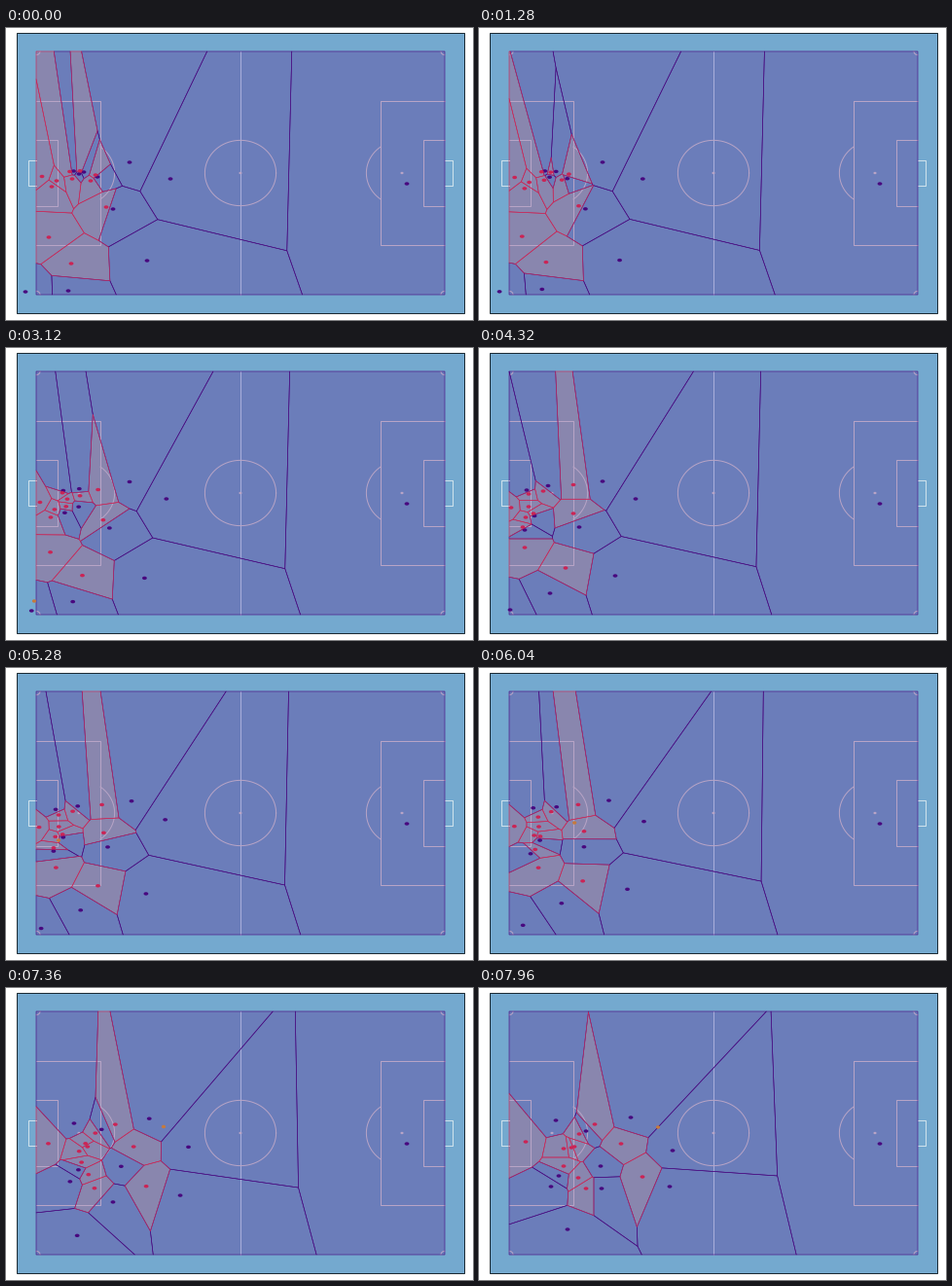
Recreate the animation shown at these times as a matplotlib script. Size 480x300 px, loop 8 s.

```python
import numpy as np
import matplotlib.pyplot as plt
from matplotlib.animation import FuncAnimation
from matplotlib.collections import EllipseCollection, PolyCollection
from matplotlib.patches import Rectangle

W, H, DPI = 480, 300, 100
STEP, FRAMES = 40, 200
TURN, END = 4320, 7960          # ms: the side drops back, then pushes out
LEFT, TOP, RIGHT, BOTTOM = 31, 24, 451, 274
SX, SY = (RIGHT - LEFT) / 105, (BOTTOM - TOP) / 68   # pixels per metre
PX = 72 / DPI

INDIGO, CRIMSON, ORANGE = "#48087f", "#cb2455", "#c67a3c"
BLUE_CELL, RED_CELL = "#6b7dba", "#8986ae"
CHALK, MIDLINE, GOAL = "#b7a4c6", "#a9aedb", "#cfe2ec"

team, runs = [], []


def run(color, start, turn=None, end=None):
    """A player's run: where it starts, turns and ends."""
    team.append(color)
    runs.append((start, turn or start, end or start))


run(INDIGO, (412, 160))
run(INDIGO, (127, 138), (127, 137), (156, 133))
run(INDIGO, (169, 155), (161, 155), (199, 167))
run(INDIGO, (110, 186), (103, 184), (125, 183))
run(INDIGO, (145, 239), (140, 234), (196, 204))
run(INDIGO, (64, 270), (73, 252), (126, 206))
run(INDIGO, (20, 271), (32, 269), (91, 248))
run(INDIGO, (69.5, 147), (49, 146), (79, 136))
run(INDIGO, (80, 148), (71, 141.5), (110, 147))
run(INDIGO, (75, 150), (47, 187), (74, 204))
run(INDIGO, (94, 153), (57, 172.5), (82, 193))

run(CRIMSON, (37, 152.5), (33, 164), (48, 158))
run(CRIMSON, (65.5, 147.5), (51, 150), (95, 164))
run(CRIMSON, (87, 157), (66, 147), (103, 150))
run(CRIMSON, (76, 146.7), (51, 163), (98, 163))
run(CRIMSON, (52, 157), (48, 174), (87, 165))
run(CRIMSON, (68, 155), (56, 170), (87, 183))
run(CRIMSON, (47, 163), (45, 184), (102, 195))
run(CRIMSON, (92, 151), (97, 140.5), (119, 140))
run(CRIMSON, (103, 184), (97, 170), (146, 160))
run(CRIMSON, (44, 215), (47, 205), (110, 206))
run(CRIMSON, (67, 242), (89, 226), (168, 194))

START, MIDDLE, FINISH = np.array(runs, float).transpose(1, 0, 2)


def positions(t):
    """Both phases set off slowly and gather speed."""
    if t < TURN:
        return START + (MIDDLE - START) * (t / TURN) ** 2
    return MIDDLE + (FINISH - MIDDLE) * ((t - TURN) / (END - TURN)) ** 2


def ball_at(t):
    """Played in from the corner, held in the box, then cleared."""
    times = (3120, TURN, 5280, 6760, END)
    return (np.interp(t, times, (29, 56, 54, 140, 184)),
            np.interp(t, times, (260, 171, 177, 142, 143)))


def clip(poly, a, b, c):
    """Keep the part of poly where a*x + b*y <= c."""
    dist = [a * x + b * y - c for x, y in poly]
    if max(dist) <= 0:
        return poly
    out = []
    for i, (p, d) in enumerate(zip(poly, dist)):
        q, e = poly[i - 1], dist[i - 1]
        if (d > 0) != (e > 0):
            f = e / (e - d)
            out.append((q[0] + f * (p[0] - q[0]), q[1] + f * (p[1] - q[1])))
        if d <= 0:
            out.append(p)
    return out


def voronoi(points):
    """Cells in pitch metres, returned in pixels; sites are kept on the pitch."""
    sites = np.clip((points - (LEFT, TOP)) / (SX, SY), 0, (105, 68)).tolist()
    cells = []
    for i, (x, y) in enumerate(sites):
        poly = [(0, 0), (105, 0), (105, 68), (0, 68)]
        for j, (u, v) in enumerate(sites):
            if j != i and poly:
                poly = clip(poly, u - x, v - y, (u*u + v*v - x*x - y*y) / 2)
        cells.append(np.array(poly or [(x, y)] * 3) * (SX, SY) + (LEFT, TOP))
    return cells


fig = plt.figure(figsize=(W / DPI, H / DPI), dpi=DPI, facecolor="white")
ax = fig.add_axes([0, 0, 1, 1])
ax.set_xlim(0, W)
ax.set_ylim(H, 0)
ax.axis("off")


def line(xs, ys, color=CHALK):
    """Pitch marking given in metres."""
    ax.plot(LEFT + np.asarray(xs) * SX, TOP + np.asarray(ys) * SY,
            color=color, lw=PX, zorder=2)


def arc(cx, cy, r, start, end):
    a = np.radians(np.linspace(start, end, 80))
    line(cx + r * np.cos(a), cy + r * np.sin(a))


def box(goal_x, depth, width, color=CHALK):
    x = [goal_x, goal_x + depth, goal_x + depth, goal_x]
    line(x, [34 - width / 2] * 2 + [34 + width / 2] * 2, color)


def dots(points, w, h, colors, z):
    return ax.add_collection(EllipseCollection(
        [w] * len(points), [h] * len(points), [0] * len(points), units="xy",
        offsets=points, offset_transform=ax.transData,
        facecolors=colors, edgecolors="none", zorder=z))


ax.add_patch(Rectangle((11, 5), 460, 288, fc="#74a9cf", ec="#1c2a33",
                       lw=PX, zorder=0))
line([52.5, 52.5], [0, 68], MIDLINE)
arc(52.5, 34, 9.15, 0, 360)
for gx, s in ((0, 1), (105, -1)):
    box(gx, 16.5 * s, 40.32)
    box(gx, 5.5 * s, 18.32)
    box(gx, -2 * s, 7.32, GOAL)
    mid = 0 if s > 0 else 180
    arc(gx + 11 * s, 34, 9.15, mid - 53.05, mid + 53.05)
    arc(gx, 0, 1, mid, mid + 90 * s)
    arc(gx, 68, 1, mid, mid - 90 * s)
dots([(LEFT + m * SX, 149) for m in (11, 52.5, 94)], 3.2, 2.4, [CHALK] * 3, 2)

cells = voronoi(START)
fills = ax.add_collection(PolyCollection(
    cells, edgecolors="none", zorder=1,
    facecolors=[BLUE_CELL if c == INDIGO else RED_CELL for c in team]))
# Shared sides are stroked twice, so each stroke is thin.
edges = ax.add_collection(PolyCollection(
    cells, facecolors="none", edgecolors=team, linewidths=0.6 * PX, zorder=3))
ball = dots([ball_at(0)], 4.2, 3.4, [ORANGE], 4)
players = dots(START, 4.8, 3.4, team, 5)


def draw(n):
    t = n * STEP
    pts = positions(t)
    cells = voronoi(pts)
    fills.set_verts(cells)
    edges.set_verts(cells)
    players.set_offsets(pts)
    ball.set_visible(t >= 2880)
    ball.set_offsets([ball_at(t)])
    return fills, edges, ball, players


anim = FuncAnimation(fig, draw, frames=FRAMES, interval=STEP, repeat=True,
                     repeat_delay=0, blit=False)
plt.show()
```
